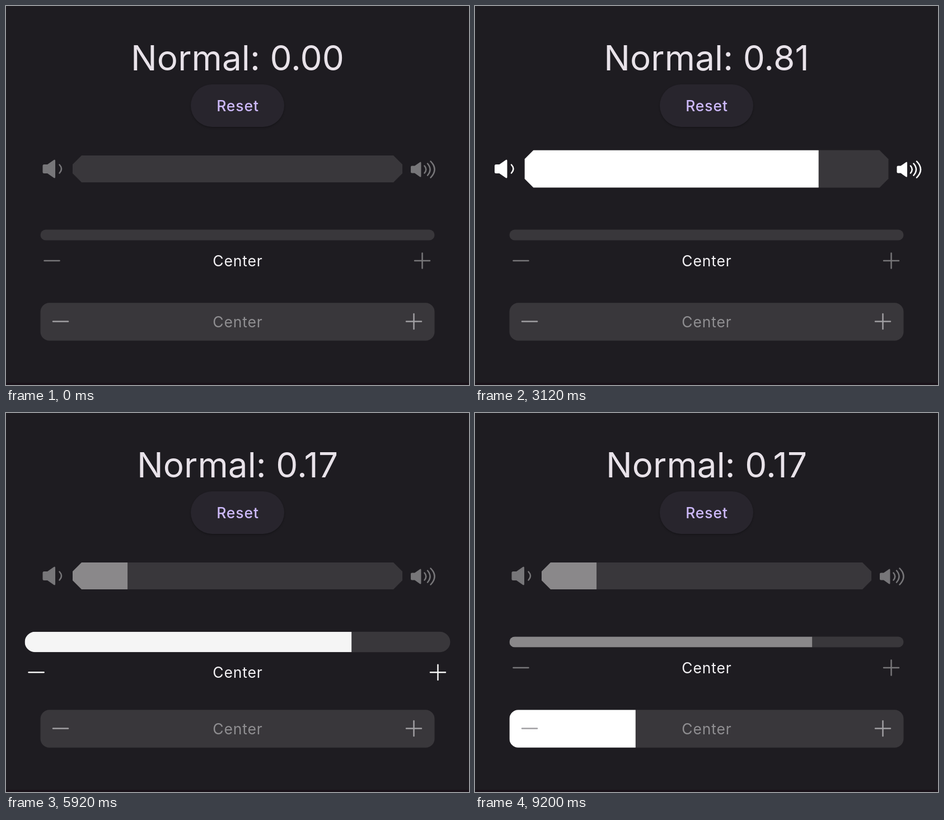
An HTML page that plays this animation: 827 px wide and 677 px high, repeating every 9520 ms.

```html
<!DOCTYPE html>
<html lang="en">
<head>
<meta charset="utf-8">
<title>Sliders</title>
<style>
  html, body { margin: 0; width: 100%; height: 100%; overflow: hidden; background: #1e1c21; }
  svg { display: block; width: 100%; height: 100%; }
  text { font: 400 26.5px Inter, Roboto, sans-serif; letter-spacing: .8px; text-anchor: middle; }
  #title { font-size: 62px; letter-spacing: .1px; fill: #e8e2e9; }
  #reset { font-weight: 500; letter-spacing: .9px; fill: #cdb9fb; }
  .track { fill: #39373b; }
  .icon { fill: none; stroke-width: 2.5; stroke-linecap: round; }
</style>
</head>
<body>
<svg viewBox="0 0 827 677">
  <defs>
    <filter id="shadow" x="-20%" y="-20%" width="140%" height="150%" color-interpolation-filters="sRGB">
      <feDropShadow dx="0" dy="1.5" stdDeviation="1.5" flood-color="#000" flood-opacity=".3"/>
    </filter>
    <path id="cone" stroke="none" d="M68 283h6l11.5-8q2.5-1.4 2.5 1.5v29q0 2.9-2.5 1.5l-11.500-8h-6q-2.500 0-2.500-2.500v-11q0-2.500 2.500-2.500z"/>
    <path id="minus" d="M-13.5 0h27"/>
    <path id="plus" d="M-13.5 0h27M0-13.5v27"/>
    <g id="quiet">
      <use href="#cone"/>
      <path fill="none" d="M95.5 283.5q7 7.5 0 15"/>
    </g>
    <g id="loud">
      <use href="#cone" transform="translate(669.3 53.4) scale(.82)"/>
      <path fill="none" d="M747.5 285.5q5.5 6.5 0 13M753 281.5q9 10.5 0 21M758.5 277.5q14 14.5 0 29"/>
    </g>
  </defs>
  <rect width="827" height="677" fill="#1e1c21"/>
  <rect y="673" width="827" height="4" fill="#1a131a"/>
  <text id="title" x="413.5" y="115"></text>
  <rect x="330" y="140" width="167" height="76" rx="38" fill="#28252d" filter="url(#shadow)"/>
  <text id="reset" x="414" y="188">Reset</text>
  <g id="sliders"></g>
</svg>
<script>
const LOOP = 9520, GROW_MS = 750, CENTER = 413.5;
const clamp = x => Math.min(1, Math.max(0, x));
const mix = (a, b, k) => a + (b - a) * k;
const smooth = u => u * u * (3 - 2 * u);
const tone = (from, to, k) => `rgb(${from.map((c, i) => Math.round(mix(c, to[i], clamp(k))))})`;

const WHITE = [255, 255, 255], DIM_FILL = [138, 136, 138], DIM_ICON = [119, 118, 121];
const FIXED_ICON = [160, 159, 162];

function elasticOut(u) {
  if (u <= 0) return 0;
  if (u >= 1) return 1;
  return 1 + 2 ** (-10 * u) * Math.sin((u - .2) * 2 * Math.PI / .8);
}

// half, tall: half width and half height as [resting, pressed]
// drags: [start, end, from, to]
const sliders = [
  { y: 291, half: [294.5, 325], tall: [24, 33.6], bevel: true, press: 540, release: 3842,
    drags: [[1710, 2860, 0, .808], [3120, 3740, .808, .161], [3800, 3860, .161, .1665]],
    icons: ['quiet', 'loud'], fillDim: DIM_FILL, iconDim: DIM_ICON, iconLit: WHITE },
  { y: 409, half: [352, 382.5], tall: [9.5, 19], radius: 99, press: 4520, release: 5912,
    drags: [[4600, 5760, 0, .768]], drop: 9, label: 465, labelColor: '#f3f1f4',
    icons: ['minus', 'plus'], spots: [[82, 455], [743.5, 455]],
    fillDim: DIM_FILL, iconDim: DIM_ICON, iconLit: WHITE },
  { y: 564, half: [352, 382.5], tall: [33.8, 43.5], radius: 16, press: 6700, release: 8320,
    drags: [[6810, 8160, 0, .32]], label: 574, labelColor: '#8f8e91',
    icons: ['minus', 'plus'], spots: [[97.5, 563.5], [728.5, 563.5]],
    fillDim: WHITE, iconDim: FIXED_ICON, iconLit: FIXED_ICON }
];

function add(parent, tag, attrs) {
  const node = document.createElementNS('http://www.w3.org/2000/svg', tag);
  set(node, attrs);
  return parent.appendChild(node);
}
function set(node, attrs) {
  for (const key in attrs) node.setAttribute(key, attrs[key]);
}

function barPath(s, w, h) {
  const c = s.bevel ? 16 : Math.min(s.radius, h);
  const corner = (dx, dy) => s.bevel ? `l${dx} ${dy}` : `a${c} ${c} 0 0 1 ${dx} ${dy}`;
  const across = 2 * (w - c), down = 2 * (h - c);
  return `M${CENTER - w + c} ${s.y - h}h${across}${corner(c, c)}v${down}${corner(-c, c)}` +
    `h${-across}${corner(-c, -c)}v${-down}${corner(c, -c)}z`;
}

sliders.forEach((s, i) => {
  const g = add(document.getElementById('sliders'), 'g', {});
  s.clip = add(add(g, 'clipPath', { id: 'clip' + i }), 'path', {});
  s.track = add(g, 'path', { class: 'track' });
  s.fill = add(g, 'rect', { 'clip-path': `url(#clip${i})` });
  s.marks = s.icons.map(name => add(g, 'use', { href: '#' + name, class: 'icon' }));
  if (s.label) {
    s.text = add(g, 'text', { x: CENTER + .4, fill: s.labelColor });
    s.text.textContent = 'Center';
  }
});

function valueAt(s, t) {
  let value = 0;
  for (const [start, end, from, to] of s.drags)
    if (t >= start) value = mix(from, to, smooth(clamp((t - start) / (end - start))));
  return value;
}

function drawSlider(s, t) {
  const grow = t < s.release
    ? elasticOut((t - s.press) / GROW_MS)
    : 1 - elasticOut((t - s.release) / GROW_MS);
  const w = mix(...s.half, grow), h = mix(...s.tall, grow), drop = (s.drop || 0) * grow;
  const d = barPath(s, w, h);
  set(s.clip, { d });
  set(s.track, { d });
  set(s.fill, {
    x: CENTER - w, y: s.y - h, width: 2 * w * valueAt(s, t), height: 2 * h,
    fill: tone(s.fillDim, WHITE, grow)
  });
  const color = tone(s.iconDim, s.iconLit, grow);
  const spread = w - s.half[0];
  s.marks.forEach((mark, i) => {
    const [x, y] = s.spots ? s.spots[i] : [0, 0];
    set(mark, {
      transform: `translate(${x + (i ? spread : -spread)} ${y + drop})`,
      style: `stroke:${color};fill:${color}`
    });
  });
  if (s.text) set(s.text, { y: s.label + drop });
}

const title = document.getElementById('title');
const began = performance.now();
function frame() {
  const t = (performance.now() - began) % LOOP;
  title.textContent = 'Normal: ' + valueAt(sliders[0], t).toFixed(2);
  sliders.forEach(s => drawSlider(s, t));
  requestAnimationFrame(frame);
}
frame();
</script>
</body>
</html>
```
